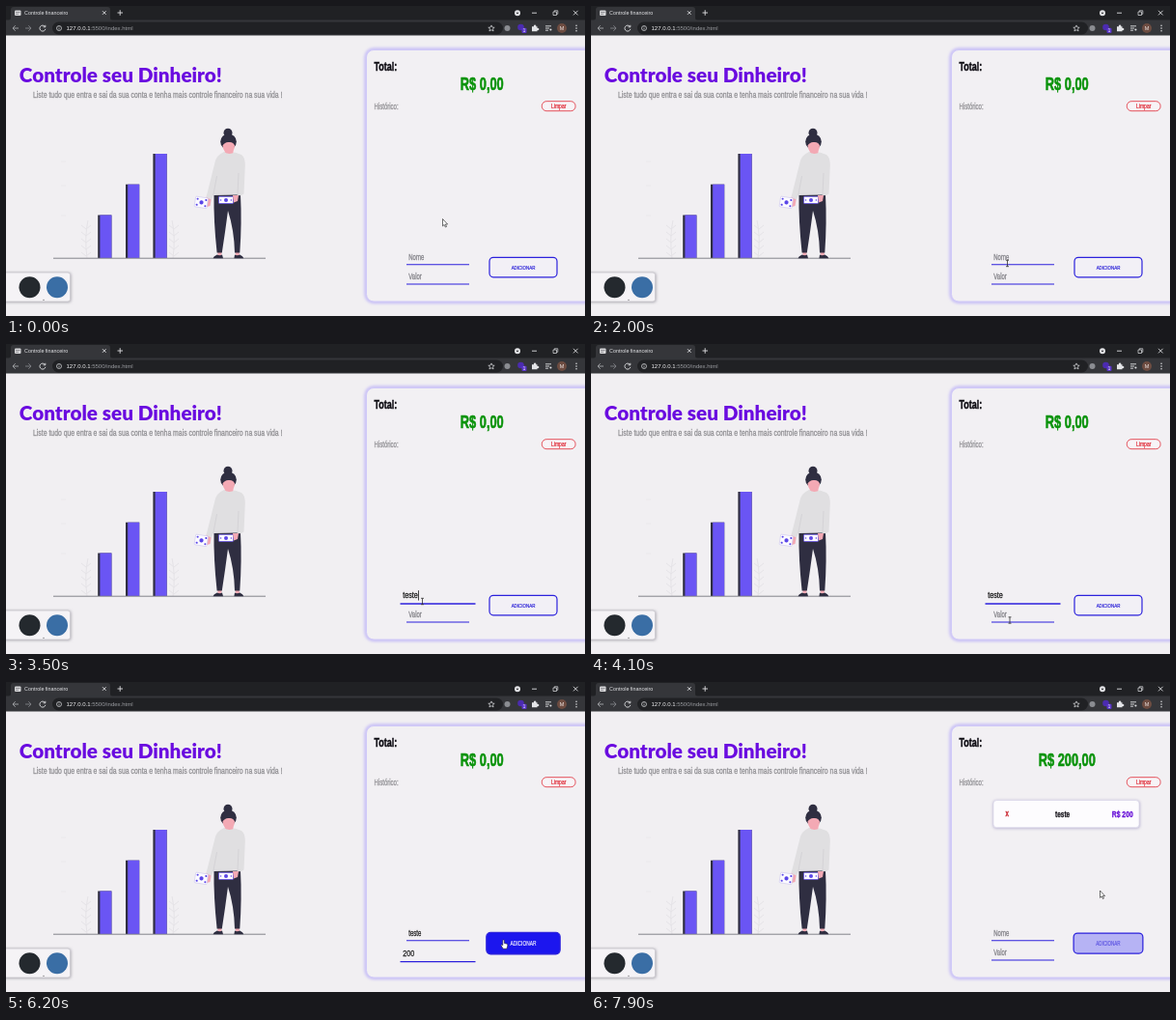
Write an HTML page that moves like this. It is 600x321 px and loops after 8 s.

```html
<!DOCTYPE html>
<html lang="pt-BR">
<head>
<meta charset="utf-8">
<title>Controle financeiro</title>
<style>
  html, body { margin: 0; width: 100%; height: 100%; overflow: hidden; background: #f1eff2; }
  svg { display: block; width: 100vw; height: 100vh; }
  text { font-family: "Liberation Sans", Arial, sans-serif; white-space: pre; }
  .title { font-family: Lato, "Noto Sans", sans-serif; font-weight: 900; }
  /* condensed, slightly heavy face used all over the page */
  .n { transform: scaleX(.72); transform-box: fill-box; transform-origin: left;
       fill: currentColor; stroke: currentColor; stroke-width: .035em; }
  .m { text-anchor: middle; transform-origin: center; }
  .b { font-weight: bold; }
  .i { fill: none; stroke: #dfe0e3; stroke-width: .9; }
</style>
</head>
<body>
<svg viewBox="0 0 600 321">
  <defs>
    <filter id="glow" x="-10%" y="-10%" width="120%" height="120%"><feGaussianBlur stdDeviation="1.6"/></filter>
  </defs>
  <rect width="600" height="321" fill="#f1eff2"/>

  <!-- browser -->
  <rect width="600" height="15" fill="#202124"/>
  <path d="M2 15Q5 15 5 12V4Q5 1 8 1H105Q108 1 108 4V12Q108 15 111 15Z" fill="#35363a"/>
  <rect y="14.5" width="600" height="16" fill="#35363a"/>
  <rect x="48" y="16.5" width="467" height="13" rx="6.5" fill="#202124"/>
  <rect x="9" y="4.5" width="6.5" height="5.5" rx="1" fill="#d8d8da"/>
  <path d="M10 6.5H14.5M10 8.3H13" stroke="#77777d" stroke-width=".7"/>
  <text x="19" y="9.3" font-size="5.4" fill="#e4e5e8">Controle financeiro</text>
  <text x="62.5" y="25.2" font-size="6" fill="#9a9ca1"><tspan fill="#f1f1f3">127.0.0.1</tspan>:5500/index.html</text>
  <g class="i">
    <path d="M100 5.2L103.6 8.8M103.6 5.2L100 8.8M115.5 7H121M118.2 4.2V9.8"/>
    <path d="M545 7.2H550M588 4.8L592.6 9.4M592.6 4.8L588 9.4"/>
    <path d="M567 6H570.5V9.5H567ZM568.3 6V4.8H571.8V8.3H570.5" stroke-width=".7"/>
    <path d="M13 23H7M9.7 20.2L7 23L9.7 25.8" stroke="#a5a7ab"/>
    <path d="M20 23H26M23.3 20.2L26 23L23.3 25.8" stroke="#808287"/>
    <path d="M40.3 21.2A3 3 0 1 0 40.9 23.8M40.8 19.8V21.8H38.6"/>
    <circle cx="55" cy="23" r="2.5" stroke-width=".7"/><path d="M55 22.6V24.4M55 21.3V21.9" stroke-width=".7"/>
    <path d="M503 19.9L504 22.1L506.2 22.3L504.5 23.7L505.1 26L503 24.7L500.9 26L501.5 23.7L499.8 22.3L502 22.1Z" stroke-width=".7"/>
    <path d="M559 20.8H565M559 23H563M559 25.2H562"/>
  </g>
  <circle cx="530" cy="7.3" r="3" fill="#e4e5e8"/>
  <path d="M528.6 6.7H531.4L530 8.5Z" fill="#202124"/>
  <circle cx="519.5" cy="23" r="3" fill="#8b8d92"/>
  <circle cx="533.5" cy="22" r="3.3" fill="#4b2bb0"/>
  <rect x="534.5" y="22.8" width="5" height="5.2" rx="1" fill="#5a35c9"/>
  <text x="537" y="27" font-size="4.5" fill="#fff" text-anchor="middle">1</text>
  <path d="M545 21.3H547A1.2 1.2 0 1 1 549.2 21.3H550.5V23A1.2 1.2 0 1 1 550.5 25V26.3H545Z" fill="#e4e5e8"/>
  <circle cx="564.4" cy="24.5" r="1.1" fill="#dfe0e3"/>
  <circle cx="576" cy="23" r="5" fill="#6d4c41"/>
  <text x="576" y="25" font-size="5.5" fill="#f1e9e6" text-anchor="middle">M</text>
  <path d="M591 20.3h.1M591 23h.1M591 25.7h.1" stroke="#e4e5e8" stroke-width="1.4" stroke-linecap="round"/>

  <!-- heading -->
  <text class="title" x="13.8" y="79.3" font-size="20.7" fill="#6a0be0">Controle seu Dinheiro!</text>
  <text class="n" x="28" y="95.3" font-size="9.55" color="#929195">Liste tudo que entra e sai da sua conta e tenha mais controle financeiro na sua vida !</text>

  <!-- chart -->
  <g id="plants" fill="none" stroke="#e5e3e7" stroke-width="1"></g>
  <g id="bars"></g>
  <path d="M49 261.2H269" stroke="#77767f" stroke-width=".9"/>

  <!-- woman -->
  <g>
    <path d="M219.5 254H223.5L223.2 259H219.5ZM237.6 254H241.6L242 259H238Z" fill="#f3a9b4"/>
    <path d="M215.5 195H243Q244.5 225 242.3 255.5H237Q236.5 232 230 212Q227 235 223.8 255.5H218.6Q215 222 215.5 195Z" fill="#2f2e41"/>
    <path d="M218.8 257.5Q221.5 259 224 257.5L225 261.3H214.5Q215 259.3 218.8 257.5ZM237 257.5Q239.5 259 242.3 257.5Q245.8 259.3 246.3 261.3H236.4Z" fill="#2f2e41"/>
    <path d="M208 196L213 198L211.5 207L206.5 208.5Z" fill="#f3a9b4"/>
    <path d="M227 147H235.5V154Q231 157 226.5 154Z" fill="#f3a9b4"/>
    <path d="M226 151Q231 154.5 237 151.5L244 154Q248 157 247.8 165L246.5 194.5Q243 197.5 239 195.5L215 196L212.8 200.5L207.5 198L217 160Q219 154 226 151Z" fill="#e0dfe1"/>
    <path d="M218.5 176L214.8 196M241 173L240 195" fill="none" stroke="#cecdd1" stroke-width=".7"/>
    <circle cx="230" cy="131.3" r="4.5" fill="#2f2e41"/>
    <ellipse cx="230.5" cy="140.5" rx="8.3" ry="8" fill="#2f2e41"/>
    <path d="M224.5 144.5Q227 140.5 231 141Q235.5 140.5 237 144.5Q236.5 152 231 152.2Q225.3 152 224.5 144.5Z" fill="#f3a9b4"/>
    <g transform="rotate(9 202.5 203.5)">
      <rect x="195.8" y="198" width="13" height="10.8" rx="1" fill="#fbfaff" stroke="#cfc9ee" stroke-width=".6"/>
      <circle cx="202.5" cy="203.4" r="2.1" fill="#5b46e8"/>
      <path d="M198 200.3h.1M206.8 200.3h.1M198 206.5h.1M206.8 206.5h.1" stroke="#5b46e8" stroke-width="2" stroke-linecap="round"/>
    </g>
    <rect x="220.5" y="197.3" width="15" height="7.2" rx=".8" fill="#fbfaff" stroke="#5b46e8" stroke-width=".7"/>
    <circle cx="228" cy="201" r="2" fill="#5b46e8"/>
    <path d="M222.5 201h.1M233.3 201h.1" stroke="#5b46e8" stroke-width="1.4" stroke-linecap="round"/>
    <path d="M235 196H241L240 202L236 203.5Z" fill="#f3a9b4"/>
  </g>

  <!-- links -->
  <rect x="-5" y="276" width="72.5" height="31" rx="3" fill="#aaa8b0" filter="url(#glow)"/>
  <rect x="-5" y="276" width="71.5" height="30" rx="2.5" fill="#f5f3f6" stroke="#c9c7cd" stroke-width=".8"/>
  <circle cx="24.5" cy="291.2" r="11" fill="#24292e"/>
  <circle cx="53" cy="291.2" r="11" fill="#3a6ea5"/>
  <circle cx="39" cy="304.3" r=".6" fill="#555"/>

  <!-- account panel -->
  <rect x="373" y="45" width="240" height="261.5" rx="8" fill="none" stroke="#c0b6f7" stroke-width="3" filter="url(#glow)"/>
  <rect x="373.5" y="45.5" width="239" height="260.5" rx="7.5" fill="#f2f0f3" stroke="#d0c9f8" stroke-width="1"/>
  <text class="n b" x="381.5" y="67" font-size="12.5" color="#0d0b12">Total:</text>
  <text class="n m b" id="total" x="493.3" y="87" font-size="17.8" color="#0b930b"></text>
  <text class="n" x="381.5" y="106.7" font-size="8.4" color="#929195">Histórico:</text>
  <rect x="555.3" y="98.7" width="34.8" height="10" rx="4.8" fill="#f7f4f7" stroke="#e4505a" stroke-width="1"/>
  <text class="n m" x="572.7" y="106.2" font-size="7" color="#e02632">Limpar</text>

  <g id="card">
    <rect x="416.5" y="122.5" width="152.5" height="29.5" rx="4" fill="#bdb7d4" filter="url(#glow)"/>
    <rect x="417" y="122.5" width="151" height="28.2" rx="3.5" fill="#fdfcfe" stroke="#dcd8ea" stroke-width=".7"/>
    <text class="n m b" x="431" y="139" font-size="8.5" color="#c81e28">x</text>
    <text class="n m b" x="488.5" y="139.8" font-size="9" color="#1b191f">teste</text>
    <text class="n b" x="539.7" y="139.8" font-size="9.5" color="#6a14d8">R$ 200</text>
  </g>

  <g id="name">
    <text class="n" x="417.3" y="262.6" font-size="8.3"></text>
    <path d="M415 267.7H480" stroke="#2c20dc" stroke-width="1.1"/>
    <path class="caret" stroke="#222" stroke-width=".7"/>
  </g>
  <g id="value">
    <text class="n" x="417.3" y="283.1" font-size="8.3"></text>
    <path d="M415 288H480" stroke="#2c20dc" stroke-width="1.1"/>
    <path class="caret" stroke="#222" stroke-width=".7"/>
  </g>
  <g id="add">
    <rect x="501" y="260.3" width="70" height="20.5" rx="4" stroke="#2c22dc" stroke-width="1.2"/>
    <text class="n m" x="536" y="273" font-size="6.2"  >ADICIONAR</text>
  </g>

  <g id="pointer">
    <path d="M0 0V7.4L1.7 5.9L2.9 8.5L4 8L2.9 5.5H5.1Z" fill="#fff" stroke="#333" stroke-width=".7"/>
    <path d="M-1.5 -3.2H1.5M0 -3.2V3.2M-1.5 3.2H1.5" stroke="#333" stroke-width=".8"/>
    <path d="M-1.2 -3.5Q-.4 -4.6 .4 -3.5V-.5L3.3 .2Q4 .6 3.8 2L3 5.2H-.9L-3 1.6Q-2.8 .6 -1.2 1.6Z" fill="#fff" stroke="#222" stroke-width=".6"/>
  </g>
</svg>
<script>
const LOOP = 8000, ADDED = 6650;
const $ = id => document.getElementById(id);
const ease = (t, from, to) => {
  const k = Math.min(1, Math.max(0, (t - from) / (to - from)));
  return k * k * (3 - 2 * k);
};
const mix = (a, b, k) => a + (b - a) * k;
const rgb = (a, b, k) => `rgb(${a.map((v, i) => Math.round(mix(v, b[i], k)))})`;
const zoom = (el, x, y, s) =>
  el.setAttribute('transform', `translate(${x} ${y}) scale(${s}) translate(${-x} ${-y})`);

$('bars').innerHTML = [[95.2, 216.5], [124, 184.7], [152.4, 153]].map(([x, y]) =>
  `<rect x="${x}" y="${y}" width="14.2" height="${261 - y}" fill="#2f2e41"/>
   <rect x="${x + 2.2}" y="${y}" width="12" height="${261 - y}" fill="#6a55f4"/>`).join('');
$('plants').innerHTML = [[84, 1], [173, -1]].map(([x, d]) => {
  let p = `M${x} 261Q${x - 3 * d} 240 ${x + d} 222`;
  for (let y = 228; y < 258; y += 7) p += `M${x - d} ${y + 3}l-5 -4M${x - d} ${y + 3}l5 -4`;
  return `<path d="${p}"/>`;
}).join('') + '<path d="M57 161h5M57 186h5M57 217h5" opacity=".6"/>';

// time, x, y
const path = [[0, 452.5, 220.5], [300, 452.5, 220.5], [1050, 431.5, 266.5], [3650, 431.5, 266.5],
  [4000, 434, 286], [5500, 434, 286], [5950, 516, 271], [7500, 516, 271], [7800, 527.5, 216], [LOOP, 527.5, 216]];

function pointer(t) {
  const i = path.findIndex(p => p[0] > t);
  const [a, b] = [path[i - 1], path[i]], k = ease(t, a[0], b[0]);
  const x = mix(a[1], b[1], k), y = mix(a[2], b[2], k);
  const shape = x > 498 && x < 574 && y > 259 && y < 282 ? 2
    : x > 408 && x < 487 && y > 254 && y < 290 ? 1 : 0;
  $('pointer').setAttribute('transform', `translate(${x} ${y})`);
  [...$('pointer').children].forEach((el, n) => el.style.display = n === shape ? '' : 'none');
}

function field(t, f) {
  const el = $(f.id), [label, , caret] = el.children;
  const typed = t < ADDED ? f.keys.filter(k => k <= t).length : 0;
  label.textContent = typed ? f.text.slice(0, typed) : f.hint;
  label.setAttribute('color', typed ? '#222' : '#828187');
  zoom(el, 447.5, f.y, 1 + .2 * (ease(t, f.focus, f.focus + 300) - ease(t, f.blur, f.blur + 300)));
  const last = typed ? f.keys[typed - 1] : f.focus;
  const lit = t >= f.focus && t < f.blur && (t - last) % 1000 < 500;
  const x = 417.3 + (typed ? label.getComputedTextLength() * .72 + .6 : 0);
  caret.setAttribute('d', lit ? `M${x} ${f.y - 5}v8.6` : '');
}

const fields = [
  { id: 'name', hint: 'Nome', text: 'teste', y: 261.2, focus: 2100, blur: 4500, keys: [3000, 3130, 3250, 3380, 3500] },
  { id: 'value', hint: 'Valor', text: '200', y: 280, focus: 4500, blur: 6500, keys: [4900, 5100, 5300] }
];

function draw(now) {
  const t = now % LOOP;
  fields.forEach(f => field(t, f));
  $('total').textContent = t < ADDED ? 'R$ 0,00' : 'R$ 200,00';
  $('card').style.display = t < ADDED ? 'none' : '';
  const hover = ease(t, 5840, 6140) - ease(t, 7680, 8020);
  const [box, label] = $('add').children;
  zoom($('add'), 536, 270.5, 1 + .09 * hover);
  box.setAttribute('fill', rgb([242, 240, 246], [28, 22, 238], hover));
  label.setAttribute('color', rgb([44, 34, 216], [236, 234, 255], hover));
  pointer(t);
  requestAnimationFrame(draw);
}
requestAnimationFrame(draw);
</script>
</body>
</html>
```
